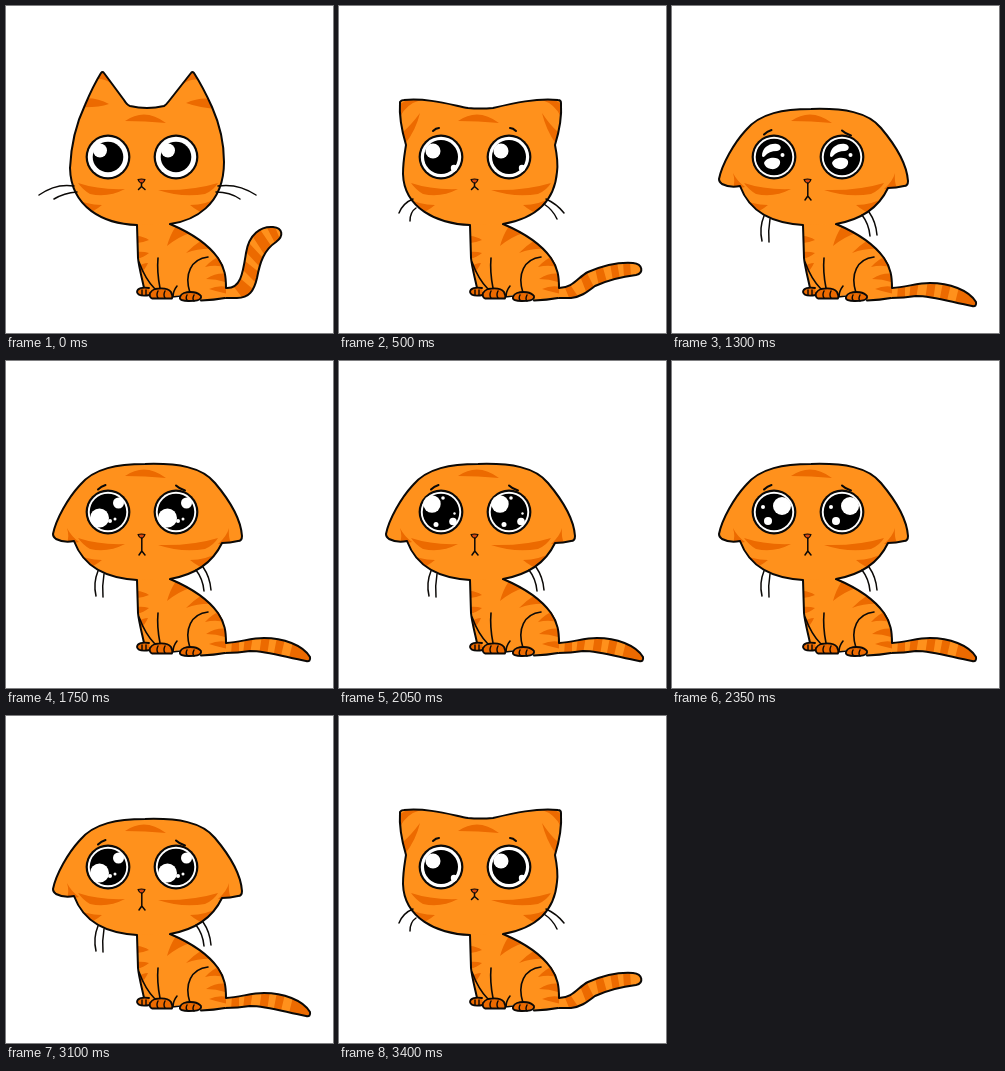
An HTML page with a canvas for the animation above (3.6 s loop, 327x327 px).

```html
<!DOCTYPE html>
<html lang="en">
<head>
<meta charset="utf-8">
<title>Sad cat</title>
<style>
  html, body { margin: 0; width: 100%; height: 100%; overflow: hidden; background: #fff; }
  canvas { display: block; width: 100vw; height: 100vh; }
</style>
</head>
<body>
<canvas id="stage"></canvas>
<script>
const SIZE = 327, LOOP = 3600;
const FUR = '#ff911c', STRIPE = '#ec6a00', INK = '#0b0907';
const canvas = document.getElementById('stage');
const ctx = canvas.getContext('2d');
const ratio = window.devicePixelRatio || 1;
canvas.width = canvas.height = SIZE * ratio;

function fill(d, color) {
  ctx.fillStyle = color;
  ctx.fill(new Path2D(d));
}

function line(d, width = 1.6) {
  ctx.strokeStyle = INK;
  ctx.lineWidth = width;
  ctx.stroke(new Path2D(d));
}

function striped(d, stripes) {
  fill(d, FUR);
  ctx.save();
  ctx.clip(new Path2D(d));
  fill(stripes, STRIPE);
  ctx.restore();
}

function disc(x, y, r, color) {
  ctx.beginPath();
  ctx.arc(x, y, r, 0, Math.PI * 2);
  ctx.fillStyle = color;
  ctx.fill();
}

const poses = {
  happy: {
    pupil: 15.3,
    head: 'M131 219C98 218 65 202 64 162C65 140 69 120 79 99Q87 80 95 67Q96.5 65 98 67L118 94Q121 99 124 100Q141 104 158 100Q160 99 163 95L185 67Q186 65 188 67Q197 81 206 101C214 119 218 137 218 156C218 200 187 215 164 218',
    ears: 'M86 74Q97 71 106 78L98 62L90 64ZM72 93Q89 90 103 98Q91 102 72 101ZM177 78Q187 71 198 75L190 62ZM180 97Q197 89 214 95L212 103Q194 102 180 97Z',
    tail: 'M220 282C235 283 237 266 240 247C243 228 255 220 267 221C277 222 278 230 270 236C258 244 254 256 251 272C248 285 243 292 231 292L219 292',
    bands: 'M259 218L268 218L275 236L270 239ZM245 228L253 222L266 241L258 248ZM239 245L243 237L257 252L253 260ZM235 262L239 255L254 267L250 277ZM228 281L235 273L248 284L238 294Z',
    whiskers: 'M68 180Q50 177 33 189M71 186Q58 187 48 193M212 180Q232 177 250 189M210 186Q224 186 234 193',
    brows: ''
  },
  wary: {
    pupil: 17,
    head: 'M131 219C98 218 65 202 64 168C64 155 66 146 67 139C62 122 60 110 61 96Q62 94 65 94C89 92 109 98 129 102Q141 103 154 102C175 97 197 92 219 94Q222 94 222 97C223 112 220 126 216 139C218 149 219 159 218 166C215 202 187 214 164 218',
    ears: 'M61 111Q67 98 82 94L68 94L61 98ZM64 126Q72 119 81 107Q77 124 66 138ZM222 111Q216 98 203 94L216 94L222 98ZM219 126Q211 119 203 107Q207 124 217 138Z',
    tail: 'M220 282C234 282 239 271 249 266C263 260 280 256 294 257C304 258 305 267 297 269C280 271 267 275 256 280C247 287 241 291 232 292L219 292',
    bands: 'M284 255L291 255L292 271L285 272ZM271 257L278 256L281 273L274 275ZM256 262L263 258L268 276L260 280ZM241 270L247 265L255 281L248 288ZM226 282L232 280L240 292L231 294Z',
    whiskers: 'M74 193Q64 197 60 207M77 202Q71 206 71 215M207 193Q218 198 225 207M205 198Q214 204 218 213',
    brows: 'M94 125Q97 122 100 122M171 122Q174 122 177 125'
  },
  sad: {
    pupil: 18.3,
    head: 'M131 219C101 217 78 207 68 180Q58 182 50 178Q47 176 47 173C50 158 62 137 74 124C88 107 112 103 139 103C172 102 196 106 209 122C225 141 235 160 236 175Q236 180 232 180Q224 182 216 182C206 203 187 214 164 218',
    ears: 'M61 167Q65 175 73 181L60 184Q64 177 61 167ZM223 167Q221 175 212 183L226 184Q222 177 223 167Z',
    tail: 'M220 282C235 281 245 277 258 277C277 277 297 284 304 296Q305 301 300 300C282 297 262 290 244 290Q232 292 219 292',
    bands: 'M226 279L233 278L233 294L225 294ZM239 276L247 275L244 293L237 293ZM256 274L264 275L261 295L253 294ZM271 276L279 278L274 299L267 297ZM287 281L308 290L306 303L282 301Z',
    whiskers: 'M92 210Q87 222 90 235M98 213Q96 225 97 236M190 209Q197 218 198 230M197 206Q204 216 205 229',
    brows: 'M92 128.5Q95 125.5 99.5 124M170 124.5Q173 127.5 179 129.5'
  }
};

// Highlights as [dx, dy, r] from the pupil centre
const glints = {
  happy: [[-8, -6.5, 7]],
  wary: [[-8, -6, 7.5], [13, 11, 3.2]],
  sad: [
    [[-9, -8, 8.7], [12, 9.5, 3.8], [-5, 12.5, 2.5], [13.5, 1.5, 1.2], [2, -14, 1.8]],
    [[8, -6, 9], [-6, 9, 4], [-11, -5, 2]],
    [[-8.5, 6, 9.5], [10.5, -9, 5.5], [2, 9, 2], [7, 7, 1.5]],
    [[8.5, -2, 2]]
  ]
};

function drawTail(pose) {
  striped(pose.tail, pose.bands);
  line(pose.tail, 2);
}

function drawBody() {
  striped('M131 217L132 255L138 283L143 290L166 291L175 289L195 294L220 292L220 281C220 268 218 259 212 251C202 238 183 226 164 217',
    'M161 240Q164 229 170 220L184 227Q172 231 161 240ZM180 247Q188 239 196 234L207 243Q194 242 180 247ZM199 261Q206 253 215 250L222 262Q211 258 199 261ZM200 273Q211 266 222 268L222 277Q211 273 200 273ZM203 283Q212 279 222 281L222 288Q212 286 203 283ZM130 230Q137 230 143 234Q136 237 130 237ZM130 246Q137 245 143 247Q137 252 130 253ZM131 261Q137 257 142 257Q139 264 133 269Z');
  line('M131 219L132 252C133 262 136 272 138 282', 2);
  line('M164 218C183 226 202 238 212 252C219 262 220 271 220 282M195 294.5Q208 294 219 292', 2);
  line('M133 256C137 267 142 276 149 283M152 252C151 263 152 272 154 282M171 280Q167 285 167 291M166 291L175 290');
  line('M202 251C185 253 178 268 184 287');
  paw('M143 282C137 281 131 282 131 286Q132 291 144 289', 'M136 284L136 289M140 284L140 289');
  paw('M149 283C155 282 162 282 165 286Q167 290 166 292.5L146 292.5Q143 291 144 287Q146 284 149 283Z', 'M152 285Q150 289 152 292M159 285Q157 289 159 292');
  paw('M178 287C184 285 192 286 195 290C196 295 188 295 183 295C177 295 173 294 174 291Q175 288 178 287Z', 'M181 289Q179 293 182 295M188 289Q186 293 188 295');
}

function paw(d, toes) {
  fill(d, STRIPE);
  line(d, 1.8);
  line(toes, 1.4);
}

function drawEye(x, pose, mood, step) {
  const y = 151;
  disc(x, y, 22.4, INK);
  disc(x, y, 20.2, '#fff');
  disc(x, y, pose.pupil, '#000');
  const spots = mood === 'sad' ? glints.sad[step] : glints[mood];
  spots.forEach(([dx, dy, r]) => disc(x + dx, y + dy, r, '#fff'));
  if (mood === 'sad' && step === 3) {
    ctx.save();
    ctx.translate(x, y);
    fill('M-12 -1C-12 -9 -5 -14 3 -13C8 -12 8 -7 3 -6Q-5 -6 -9 -1Q-11 1 -12 -1ZM-10 6C-8 0 4 -1 6 4C7 9 2 13 -3 12Q-9 11 -10 6Z', '#fff');
    ctx.restore();
  }
}

function drawHead(pose, mood, step) {
  striped(pose.head, pose.ears +
    'M119 115Q139 101 160 117Q139 115 119 115ZM72 177Q93 184 119 183Q102 192 84 188Q77 184 72 177ZM152 184Q186 185 212 177Q208 184 199 188Q176 192 152 184Z' +
    'M66 191Q80 199 96 199Q90 204 78 210ZM184 199Q200 199 216 190L203 210Q191 205 184 199Z');
  line(pose.head, 2);
  line(pose.whiskers, 1.5);
  line(pose.brows, 2);
  drawEye(102, pose, mood, step);
  drawEye(170, pose, mood, step);
  const nose = 'M132 173.5Q135.5 172.5 139 173.5Q138 176.5 135.7 177.5Q133 176.5 132 173.5Z';
  fill(nose, '#d9480f');
  line(nose, 1.1);
  line(mood === 'sad' ? 'M135.8 177V190L133 194M135.8 190L139 194' : 'M135.5 177V180.5L132.5 183.5M135.5 180.5L139 183.5', 1.5);
}

function moodAt(t) {
  if (t < 500) return ['happy', 0];
  if (t < 700 || t >= 3400) return ['wary', 0];
  // Two shimmer cycles per 1350 ms, the first one holding its start longer
  const u = (t - 700) % 1350;
  return ['sad', u < 150 ? 0 : Math.floor((u - 150) / 150) % 4];
}

function draw(t) {
  const [mood, step] = moodAt(t);
  const pose = poses[mood];
  ctx.setTransform(ratio, 0, 0, ratio, 0, 0);
  ctx.fillStyle = '#fff';
  ctx.fillRect(0, 0, SIZE, SIZE);
  ctx.lineCap = ctx.lineJoin = 'round';
  drawTail(pose);
  drawBody();
  drawHead(pose, mood, step);
}

const start = performance.now();
function tick() {
  draw((performance.now() - start) % LOOP);
  requestAnimationFrame(tick);
}
tick();
</script>
</body>
</html>
```
